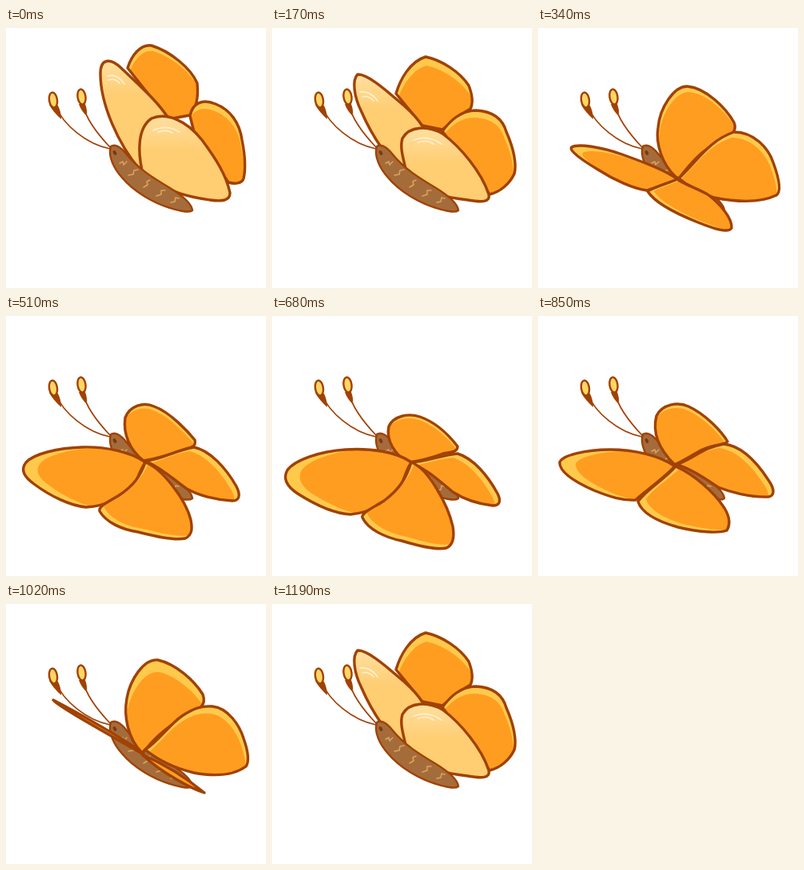
Animation, 325 px wide and 325 px high, one loop 1.36 s. Source, as an HTML page with a canvas:

```html
<!DOCTYPE html>
<html>
<head>
<meta charset="utf-8">
<style>
html, body { margin: 0; width: 100%; height: 100%; overflow: hidden; background: #fff; }
canvas { display: block; width: 100vmin; height: 100vmin; }
</style>
</head>
<body>
<canvas id="stage" width="325" height="325"></canvas>
<script>
const ctx = document.getElementById('stage').getContext('2d');
const LINE = '#a04205', ORANGE = '#ff9d20', YELLOW = '#ffc94c';
const STEP = 170;

// Upper side of a wing: a yellow rim shows where the orange is shifted by (dx, dy).
const upper = (d, dx, dy) => ({ path: new Path2D(d), dx, dy });
// Pale underside, with its top edge at y and a pair of gleams.
const under = (d, y, gleam) => ({ path: new Path2D(d), y, gleam: new Path2D(gleam) });

// Wings from back to front: far fore, far hind, near fore, near hind.
const raised = { folded: true, wings: [
  upper('M152 50C157 34 168 20 182 22C205 29 231 50 239 69C241 88 237 101 230 109L203 114Z', 2, 7),
  upper('M230 110C233 94 245 88 262 95C280 102 292 118 295 140C299 160 300 175 297 188C295 195 285 195 278 193L235 130Z', -1, 9),
  under('M168 178C140 145 118 95 118 57C118 38 130 37 144 50C165 70 190 92 203 113L190 180Z', 40, 'M127 60Q139 57 148 70M128 65Q136 62 142 69'),
  under('M170 178C165 155 164 125 182 113C200 105 225 115 245 140C262 163 275 183 280 206C280 216 270 217 255 215C235 212 200 207 172 180Z', 110, 'M184 128Q200 120 217 130M190 130Q200 126 208 131')
] };

const halfRaised = { folded: true, wings: [
  upper('M155 82C160 65 172 42 192 36C212 40 235 55 246 72C251 85 251 95 248 101C235 108 222 120 213 127L188 122Z', 1, 11),
  upper('M213 129C222 117 235 103 255 103C275 104 288 112 293 130C302 150 306 170 303 182C297 195 285 205 272 208Z', -2, 9),
  under('M166 182C145 165 125 135 112 105C102 85 100 65 107 58C120 57 145 80 165 97C175 106 183 114 188 123L213 130L185 170Z', 58, 'M110 80Q122 78 132 91M113 86Q121 84 127 91'),
  under('M168 190C170 175 158 155 163 138C172 122 195 122 213 132C235 148 262 180 271 208C273 218 262 218 245 215C220 212 195 208 172 188Z', 125, 'M177 140Q194 133 212 145M183 143Q194 139 202 145')
] };

const level = { wings: [
  upper('M172 186C155 170 147 145 150 125C152 100 170 72 187 73C210 75 235 100 245 118C250 130 240 135 225 143C205 152 190 170 176 188Z', 2, 7),
  upper('M176 188C200 165 215 140 245 130C270 130 288 150 294 168C302 190 304 205 298 209C275 220 245 217 220 212C205 206 188 198 176 188Z', -3, 7),
  upper('M174 189C160 178 130 167 105 158C80 149 50 144 42 149C38 153 55 165 75 177C95 190 120 201 136 203C150 198 163 194 174 189Z', 14, 7),
  upper('M174 189C163 194 148 198 137 204C145 217 170 231 200 243C220 251 238 257 242 250C243 238 228 220 212 208C198 200 184 196 174 189Z', 8, 0)
] };

const lowering = { wings: [
  upper('M172 181C155 168 146 148 149 127C155 112 172 107 185 113C205 120 228 145 236 155C238 163 233 164 222 167C205 173 190 178 172 181Z', -1, 5),
  upper('M174 181C195 180 210 168 235 164C255 168 275 190 288 213C294 225 291 231 283 231C262 230 240 224 226 216C210 205 195 190 174 181Z', -6, 5),
  upper('M173 182C155 170 125 163 95 164C65 165 35 172 25 183C17 193 24 202 35 210C55 225 80 237 100 239C125 238 150 225 160 210C166 202 167 193 173 185Z', 18, 1),
  upper('M174 183C168 200 160 212 140 225C128 232 115 238 117 244C125 258 145 267 165 270C185 275 210 281 224 278C233 274 233 265 231 255C225 230 195 190 174 183Z', 6, -4)
] };

const lowest = { wings: [
  upper('M170 183C154 174 142 155 146 138C152 125 170 121 185 126C205 133 222 150 232 163C232 171 222 170 214 172C200 177 190 180 172 183Z', -1, 4),
  upper('M173 183C195 182 210 174 232 172C252 178 270 200 282 222C287 232 284 237 276 237C258 235 240 229 226 220C210 207 195 192 173 183Z', -6, 5),
  upper('M173 182C155 170 125 165 92 167C60 169 28 180 19 193C13 204 20 214 32 222C54 236 78 247 98 248C124 246 150 230 160 213C166 204 167 193 173 185Z', 18, 0),
  upper('M174 183C168 202 160 216 140 231C126 240 111 246 113 252C120 267 142 277 162 281C182 287 206 293 218 290C227 286 228 275 226 263C220 236 195 190 174 183Z', 6, -5)
] };

const lifting = { wings: [
  upper('M170 185C150 165 143 145 148 125C155 110 175 107 188 113C210 123 230 145 237 157C233 162 215 160 200 170C187 177 180 182 170 186Z', -1, 5),
  upper('M173 186C195 178 205 165 232 160C255 162 275 185 288 205C297 218 295 225 288 226C265 227 240 220 225 214C210 204 190 190 173 186Z', -6, 5),
  upper('M170 187C150 174 120 167 90 167C60 167 30 174 27 183C27 195 45 207 70 218C90 226 105 231 122 230C135 218 155 205 172 187Z', 20, 2),
  upper('M172 188C160 203 135 217 125 232C130 247 150 257 175 264C200 270 225 272 236 268C241 260 239 250 233 240C220 220 195 198 172 188Z', 10, -3)
] };

const edgeOn = { wings: [
  upper('M170 186C152 168 147 140 151 118C155 95 172 68 190 70C212 75 235 95 246 113C251 126 242 132 228 139C208 148 188 165 176 180Z', 1, 15),
  upper('M174 182C190 172 205 150 220 140C235 130 245 127 258 128C278 130 292 152 297 168C303 185 304 197 300 203C285 214 262 216 235 211C210 205 190 195 174 182Z', -3, 9),
  upper('M172 187C150 170 90 136 59 120C65 128 125 161 172 188Z', 4, 2),
  upper('M170 188C195 199 225 217 248 236C235 232 195 212 170 188Z', 4, 2)
] };

const poses = [raised, halfRaised, level, lowering, lowest, lifting, edgeOn, halfRaised];

const body = new Path2D('M131 148C135 145 142 147 150 157C165 176 185 188 205 200C218 208 232 219 233 228C228 232 215 228 205 225C185 219 160 205 145 187C135 176 127 160 131 148Z');
const marks = new Path2D('M142 169l4 -2l1 4l4 -4M153 184l6 -1l1 -5l5 -1M172 199l5 -3l-1 -4l4 -2M188 210l6 -2l0 -5l5 0M206 218l5 -1l1 -5l4 1');
const feelers = new Path2D('M62 98C72 121 100 145 130 151M97 98C100 113 115 133 130 149');
const stems = new Path2D('M54 96Q59 105 69 114Q69 105 65 97ZM91 95Q94 104 101 110Q102 103 99 95Z');

function stroke(path, color, width) {
  ctx.strokeStyle = color;
  ctx.lineWidth = width;
  ctx.stroke(path);
}

function fill(path, color) {
  ctx.fillStyle = color;
  ctx.fill(path);
}

function drawWing(wing) {
  ctx.save();
  ctx.clip(wing.path);
  if (wing.gleam) {
    const shade = ctx.createLinearGradient(0, wing.y, 0, wing.y + 45);
    shade.addColorStop(0, '#ffdfa0');
    shade.addColorStop(1, '#ffcd72');
    fill(wing.path, shade);
    stroke(wing.gleam, '#fff0cc', 1.8);
  } else {
    fill(wing.path, YELLOW);
    ctx.translate(wing.dx, wing.dy);
    fill(wing.path, ORANGE);
  }
  ctx.restore();
  stroke(wing.path, LINE, 3.4);
}

function drawBody() {
  fill(body, '#a56c3b');
  stroke(body, LINE, 2.4);
  stroke(marks, '#dca45c', 1.5);
  const eye = new Path2D();
  eye.ellipse(136, 156, 2, 3, -0.5, 0, 7);
  fill(eye, '#80380f');
}

function drawFeelers() {
  stroke(feelers, LINE, 1.7);
  fill(stems, LINE);
  for (const [x, y] of [[59, 90], [94.5, 86]]) {
    const knob = new Path2D();
    knob.ellipse(x, y, 5, 9.5, -0.15, 0, 7);
    fill(knob, '#ffd565');
    stroke(knob, LINE, 2.4);
  }
}

function draw(now) {
  const pose = poses[Math.floor(now / STEP) % poses.length];
  ctx.fillStyle = '#fff';
  ctx.fillRect(0, 0, 325, 325);
  ctx.lineJoin = ctx.lineCap = 'round';
  drawFeelers();
  if (!pose.folded) drawBody();
  pose.wings.forEach(drawWing);
  if (pose.folded) drawBody();
}

const start = performance.now();
function tick() {
  draw(performance.now() - start);
  requestAnimationFrame(tick);
}
tick();
</script>
</body>
</html>
```
